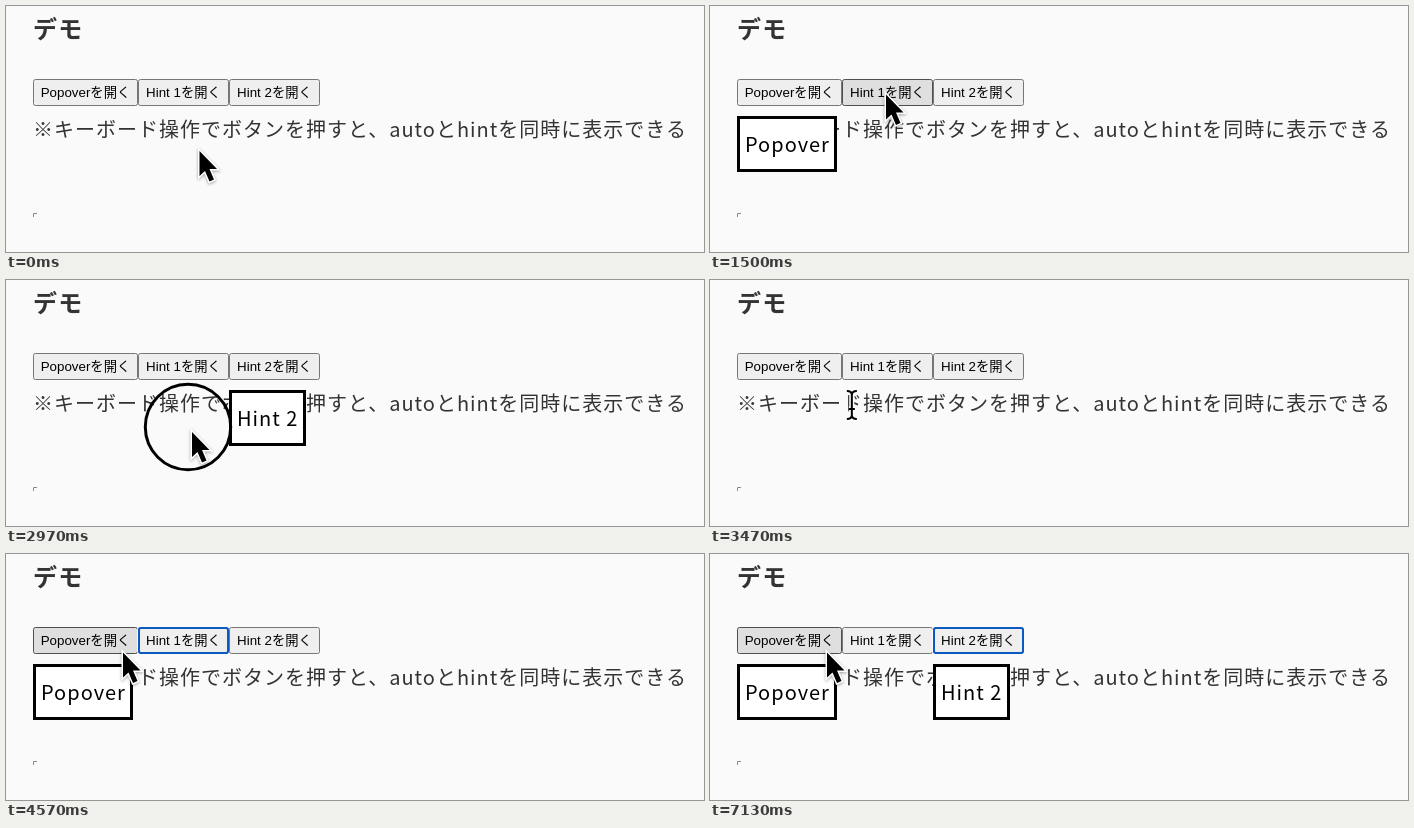
Animation, 698 px wide and 246 px high, one loop 8 s. Source, as an HTML page:

```html
<!DOCTYPE html>
<html lang="ja">
<head>
<meta charset="utf-8">
<style>
  html, body { margin: 0; width: 100%; height: 100%; overflow: hidden; background: #fafafa; }
  svg { display: block; }
  text { white-space: pre; }
  .body { font: 20px "Noto Sans CJK JP", "Noto Sans CJK", sans-serif; letter-spacing: 1px; fill: #333; }
  .title { font: bold 24px "Noto Sans CJK JP", "Noto Sans CJK", sans-serif; letter-spacing: 1.2px; fill: #333; }
  .button text { font: 13.333px "Liberation Sans", "Noto Sans CJK JP", "Noto Sans CJK", sans-serif; text-anchor: middle; }
  .face { fill: #efefef; stroke: #767676; }
  .hover .face { fill: #dfdfdf; stroke: #4f4f4f; }
  .ring { fill: none; stroke: #0b5ac2; stroke-width: 2; }
  .halo { fill: none; stroke: #fafafa; }
  .popup rect { fill: #fff; stroke: #000; stroke-width: 3; }
  .popup text { fill: #000; }
  #arrow { stroke: #fff; stroke-width: 3; paint-order: stroke; filter: drop-shadow(0 1.5px 1.5px rgba(0, 0, 0, .35)); }
  #beam path { fill: none; stroke: #000; stroke-width: 2; }
  #beam path:first-child { stroke: #fff; stroke-width: 5; }
  #click { fill: none; stroke: #000; stroke-width: 3; }
</style>
</head>
<body>
<svg id="stage" width="698" height="246" viewBox="0 0 698 246">
  <text class="title" x="27" y="32">デモ</text>
  <text class="body" x="27" y="131">※キーボード操作でボタンを押すと、autoとhintを同時に表示できる</text>
  <path d="M27.5 211V207.5H31" fill="none" stroke="#888"/>
  <g id="buttons"></g>
  <g id="popups"></g>
  <circle id="click" r="42.7"/>
  <g id="cursor">
    <path id="arrow" d="M0 0V25L5.5 20L10 30.5L14.5 28.5L10 18H17.5Z"/>
    <g id="beam"></g>
  </g>
</svg>
<script>
const LOOP = 8000;
const TOP = 73, BOTTOM = 100;
const items = [
  { label: 'Popover', x: 27, width: 105, popupWidth: 100, open: [[600, 1670], [4130, LOOP]], focus: [] },
  { label: 'Hint 1', x: 132, width: 91, popupWidth: 78, open: [[1670, 2400], [5270, 6370]], focus: [[4570, 5770]] },
  { label: 'Hint 2', x: 223, width: 91, popupWidth: 77, open: [[2400, 3000], [6370, LOOP]], focus: [[5770, LOOP]] },
];
const clicks = [[570, 600], [1630, 1670], [2370, 2400], [2970, 3000], [4100, 4130]];

// Pointer path: time, x, y. Equal neighbours are rests.
const path = [
  [0, 193.5, 145], [30, 193.5, 145], [430, 82, 81], [870, 82, 81],
  [1030, 82, 84.5], [1500, 176, 88.5], [1730, 176, 88.5],
  [2200, 272.5, 93], [2570, 272.5, 93], [2830, 186, 152], [3000, 186, 152],
  [3470, 142, 125], [3770, 58, 111], [4060, 117, 98.5], [LOOP, 117, 98.5],
];

const $ = id => document.getElementById(id);
const within = (spans, t) => spans.some(([from, to]) => t >= from && t < to);
const show = (el, on) => { el.style.display = on ? '' : 'none'; };

for (const item of items) {
  const { label, x, width, popupWidth } = item;
  $('buttons').insertAdjacentHTML('beforeend', `<g class="button">
    <rect class="face" x="${x + .5}" y="${TOP + .5}" width="${width - 1}" height="26" rx="2"/>
    <text x="${x + width / 2}" y="91">${label}を開く</text>
    <g><rect class="halo" x="${x - .5}" y="${TOP - .5}" width="${width + 1}" height="28" rx="3.5"/>
    <rect class="ring" x="${x + 1}" y="${TOP + 1}" width="${width - 2}" height="25" rx="2"/></g></g>`);
  $('popups').insertAdjacentHTML('beforeend', `<g class="popup">
    <rect x="${x + 1.5}" y="111.5" width="${popupWidth - 3}" height="53"/>
    <text class="body" x="${x + 8}" y="146">${label}</text></g>`);
  item.button = $('buttons').lastElementChild;
  item.ring = item.button.lastElementChild;
  item.popup = $('popups').lastElementChild;
}
const beamPath = '<path d="M-5 -14Q0 -14 0 -10Q0 -14 5 -14M-5 14Q0 14 0 10Q0 14 5 14M0 -10V10M-3 4H3"/>';
$('beam').innerHTML = beamPath + beamPath;

function slope(i, axis) {
  const a = path[i - 1], b = path[i], c = path[i + 1];
  const resting = (p, q) => !p || !q || (p[1] === q[1] && p[2] === q[2]);
  return resting(a, b) || resting(b, c) ? 0 : (c[axis] - a[axis]) / (c[0] - a[0]);
}

function pointer(t) {
  const i = path.findIndex((key, n) => n && t < key[0]) - 1;
  const a = path[i], b = path[i + 1], span = b[0] - a[0], u = (t - a[0]) / span;
  const ease = u * u * (3 - 2 * u);
  return [1, 2].map(axis => a[axis] + (b[axis] - a[axis]) * ease
    + span * u * (1 - u) * ((1 - u) * slope(i, axis) - u * slope(i + 1, axis)));
}

function draw(now) {
  const t = now % LOOP;
  const [x, y] = pointer(t);
  for (const item of items) {
    const hover = x >= item.x && x < item.x + item.width && y >= TOP && y < BOTTOM;
    item.button.classList.toggle('hover', hover);
    show(item.ring, within(item.focus, t));
    show(item.popup, within(item.open, t));
  }
  const overText = y > 107 && y < 142;
  show($('beam'), overText);
  show($('arrow'), !overText);
  $('cursor').setAttribute('transform', `translate(${x} ${y})`);
  show($('click'), within(clicks, t));
  $('click').setAttribute('transform', `translate(${x - 4} ${y - 5})`);
}

const start = performance.now();
function tick() {
  draw(performance.now() - start);
  requestAnimationFrame(tick);
}
tick();
</script>
</body>
</html>
```
